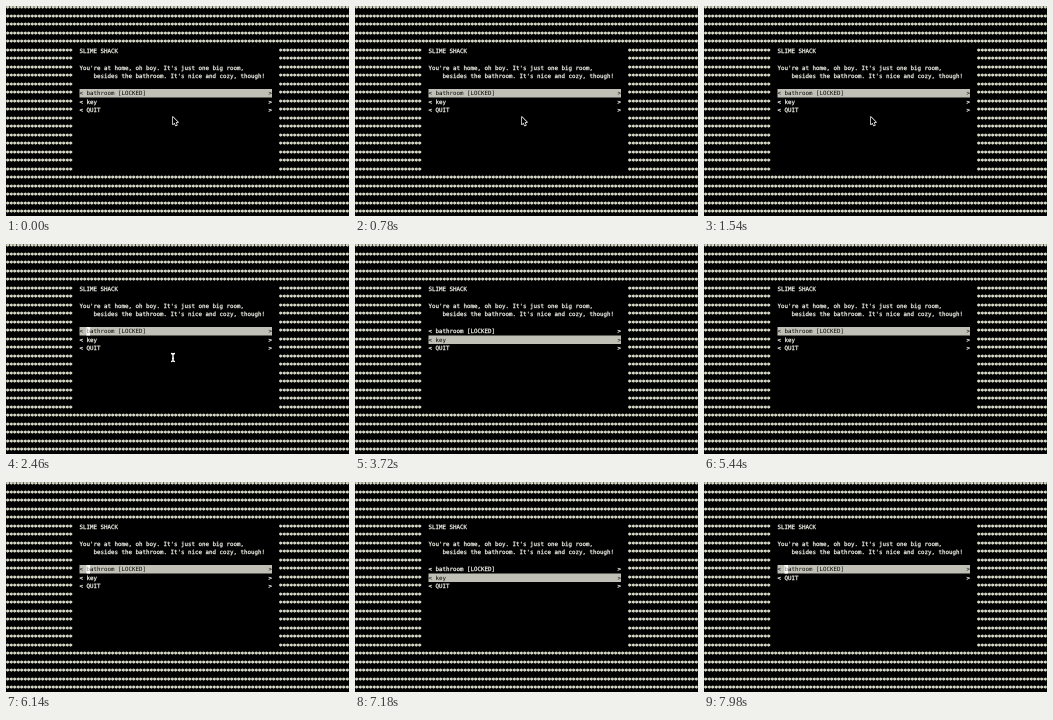
An HTML page with a canvas that plays this animation: 343 by 210 pixels, repeating every 8000 ms.

```html
<!DOCTYPE html>
<html lang="en">
<head>
<meta charset="utf-8">
<title>Slime Shack</title>
<style>
  html, body { margin: 0; width: 100%; height: 100%; overflow: hidden; background: #000; }
  canvas { display: block; }
</style>
</head>
<body>
<canvas id="stage" width="343" height="210"></canvas>
<script>
const ctx = document.getElementById('stage').getContext('2d');
const LOOP = 8000, COLS = 98, ROWS = 25;
const CELL_W = 3.5, CELL_H = 8.5, TOP = -2, BASELINE = 6.4;
const LEFT = 21, RIGHT = 75, MENU_ROW = 10;
const WHITE = '#f0f0e8', STAR = '#d8d8c8', GREY = '#c0c0b6', BLACK = '#000';

// Each key press moves the selection and restarts the blink.
const steps = [
  { at: 0, blink: -480, selected: 0, items: ['bathroom [LOCKED]', 'key', 'QUIT'] },
  { at: 3300, selected: 1 },
  { at: 4250, selected: 0 },
  { at: 6700, selected: 1 },
  { at: 7450, selected: 0, items: ['bathroom [LOCKED]', 'QUIT'] }
];
const POINTER_TO_BEAM = 2000, POINTER_HIDDEN = 3300;

function stateAt(time) {
  const state = {};
  for (const step of steps) {
    if (step.at <= time) Object.assign(state, { blink: step.at }, step);
  }
  return state;
}

function fillCells(col, row, count, color) {
  ctx.fillStyle = color;
  ctx.fillRect(col * CELL_W, TOP + row * CELL_H, count * CELL_W, CELL_H);
}

// A thin outline gives the letters the weight of smoothed terminal text.
function write(text, col, row, color = WHITE, outline = 0.25) {
  ctx.fillStyle = ctx.strokeStyle = color;
  ctx.lineWidth = outline;
  [...text].forEach((char, i) => {
    const x = (col + i) * CELL_W, y = TOP + row * CELL_H + BASELINE;
    ctx.fillText(char, x, y);
    if (outline) ctx.strokeText(char, x, y);
  });
}

function drawStars(col, row, count) {
  write('*'.repeat(count), col, row, STAR, 0.65);
}

function drawBorder() {
  for (let row = 0; row < ROWS; row++) {
    if (row < 5 || row > 19) {
      drawStars(0, row, COLS);
    } else {
      drawStars(0, row, 19);
      drawStars(78, row, 20);
    }
  }
}

function drawMenu({ items, selected, blink }, time) {
  const cursorOn = (time - blink) % 1000 >= 500;
  items.forEach((item, i) => {
    const row = MENU_ROW + i;
    const active = i === selected;
    const style = active ? [BLACK, 0] : [WHITE];
    if (active) fillCells(LEFT, row, RIGHT - LEFT + 1, GREY);
    write('< ' + item, LEFT, row, ...style);
    write('>', RIGHT, row, ...style);
    if (active && cursorOn) {
      fillCells(LEFT + 2, row, 1, '#fff');
      write(item[0], LEFT + 2, row, '#888', 0);
    }
  });
}

function drawPointer(time) {
  if (time >= POINTER_HIDDEN) return;
  const beam = time >= POINTER_TO_BEAM;
  const path = new Path2D(beam
    ? 'M165 109.5Q166.5 109.5 167 110.5Q167.5 109.5 169 109.5M167 110.5V116.5M165 117.5Q166.5 117.5 167 116.5Q167.5 117.5 169 117.5M166 114.5H168'
    : 'M166.8 111V118.3L168.5 116.7L169.7 119.5L170.9 119L169.7 116.3H172Z');
  ctx.strokeStyle = '#fff';
  ctx.lineWidth = 1.4;
  ctx.stroke(path);
  if (!beam) {
    ctx.fillStyle = BLACK;
    ctx.fill(path);
  }
}

function draw(now) {
  const time = now % LOOP;
  ctx.fillStyle = BLACK;
  ctx.fillRect(0, 0, 343, 210);
  drawBorder();
  write('SLIME SHACK', LEFT, 5);
  write("You're at home, oh boy. It's just one big room,", LEFT, 7);
  write("besides the bathroom. It's nice and cozy, though!", LEFT + 4, 8);
  drawMenu(stateAt(time), time);
  drawPointer(time);
  requestAnimationFrame(draw);
}

ctx.font = '5.81px "DejaVu Sans Mono", monospace';
ctx.textRendering = 'geometricPrecision';
ctx.lineJoin = 'round';
draw(0);
</script>
</body>
</html>
```
